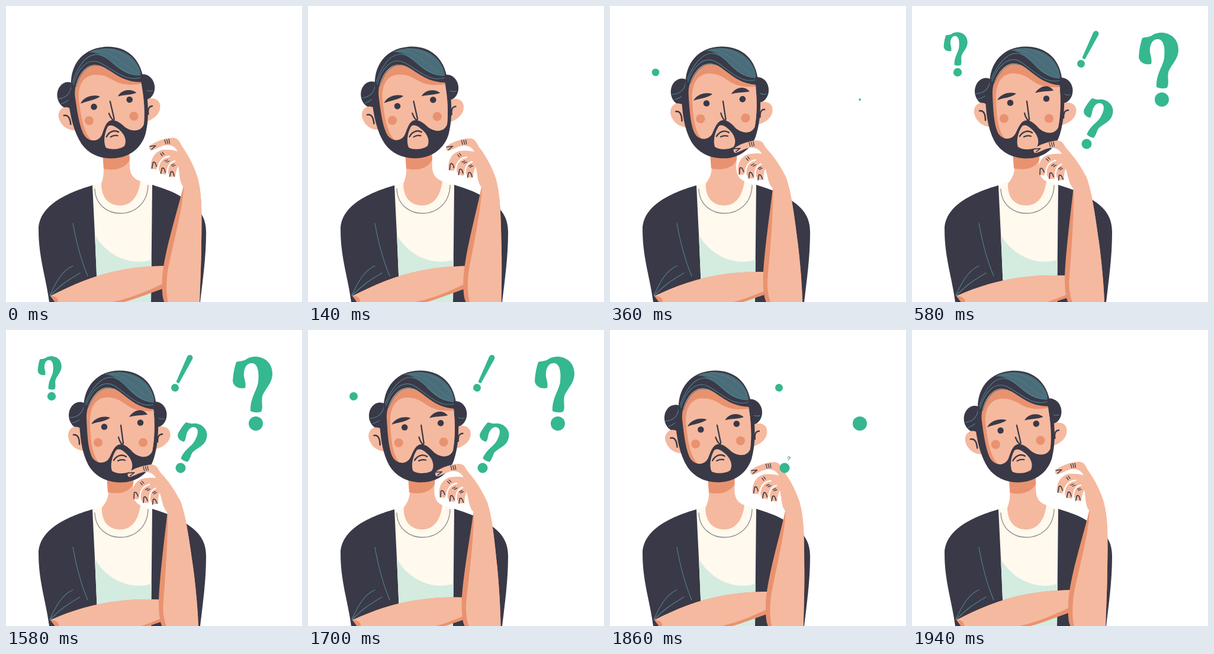
Recreate the animation shown at these times as an HTML page with a canvas. Size 500 by 500 pixels, loop 1.96 s.

```html
<!DOCTYPE html>
<html lang="en">
<head>
<meta charset="utf-8">
<title>Thinking man</title>
<style>
  html, body { margin: 0; width: 100%; height: 100%; overflow: hidden; background: #fff; }
  canvas { display: block; width: 500px; height: 500px; }
</style>
</head>
<body>
<canvas id="stage" width="500" height="500"></canvas>
<script>
const ctx = document.getElementById('stage').getContext('2d');
const LOOP = 1960, STEP = 20;
const INK = '#3a3947', SKIN = '#f5b99f', SHADE = '#e9926f', TEAL = '#4a6d79',
      THREAD = '#4f8190', CREAM = '#fff9ee', MINT = '#d4ebe0', GREEN = '#35b790';

const clamp = v => Math.max(0, Math.min(1, v));
const ramp = (t, from, to) => { const u = clamp((t - from) / (to - from)); return u * u * (3 - 2 * u); };
const lerp = (a, b, p) => a + (b - a) * p;

// Interpolates two paths with the same commands.
function blend(a, b, p) {
  const end = b.match(/-?[\d.]+/g);
  let i = 0;
  return a.replace(/-?[\d.]+/g, n => lerp(+n, +end[i++], p).toFixed(2));
}
function fill(d, color) {
  ctx.fillStyle = color;
  ctx.fill(new Path2D(d));
}
function line(d, color = INK, width = 1.6) {
  ctx.strokeStyle = color;
  ctx.lineWidth = width;
  ctx.lineCap = ctx.lineJoin = 'round';
  ctx.stroke(new Path2D(d));
}
function oval(x, y, rx, ry, color) {
  ctx.fillStyle = color;
  ctx.beginPath();
  ctx.ellipse(x, y, rx, ry, 0, 0, 7);
  ctx.fill();
}
const dot = (x, y, r, color) => oval(x, y, r, r, color);
function group(draw) {
  ctx.save();
  draw();
  ctx.restore();
}
function turn(x, y, angle) {
  ctx.translate(x, y);
  ctx.rotate(angle);
  ctx.translate(-x, -y);
}

function drawBody() {
  fill('M146 303 C108 314 55 335 55 378 C55 425 68 460 73 500 H328 C332 465 338 425 338 382 C338 355 325 338 297 323 C283 313 262 307 247 302Z', INK);
  const shirt = 'M146 303 L163 297 H229 L247 302 L246 400 L245 500 H155 Q151 400 146 303Z';
  fill(shirt, CREAM);
  group(() => {
    ctx.clip(new Path2D(shirt));
    fill('M148 383 C165 415 195 432 225 432 C235 432 242 430 248 428 V500 H148Z', MINT);
  });
  line('M150 309 C152 365 238 365 240 303', '#929292', 1.4);
  line('M113 367 C118 395 127 430 138 456', THREAD, 1.2);
  line('M74 489 C85 465 95 447 113 439', THREAD, 1.2);
  line('M75 489 C95 468 110 460 125 451', THREAD, 1.2);
}

function drawNeck(p) {
  fill(blend(
    'M163 245 L165 274 C165 286 164 292 161 300 C161 322 172 337 193 337 C213 337 224 320 227 296 C215 292 209 284 209 270 L208 245Z',
    'M170 245 L173 274 C173 286 166 295 162 300 C161 322 172 337 193 337 C213 337 224 320 227 296 C218 292 214 284 214 270 L216 245Z', p), SKIN);
  fill(blend(
    'M163 245 L165 275 C182 279 201 275 209 260 L208 245Z',
    'M170 245 L172 274 C190 278 208 275 215 260 L216 245Z', p), SHADE);
}

function drawHair() {
  fill('M132 168 C133 125 152 97 172 97 C196 97 208 130 250 134 L256 166 L254 130 C252 90 227 68.5 192 68.5 C155 68.5 130 95 131 135 L124 150Z', INK);
  fill('M166 75 C200 63 243 78 250 116 C251 121 249 123 246 122 C228 120 218 111 208 101 C196 88 184 76 166 75Z', TEAL);
  line('M135 127 C145 101 163 83 183 94 C205 108 224 132 249 126', THREAD, 1.1);
  line('M134 123 C144 100 160 78 179 80 C202 83 215 119 249 122', THREAD, 1.1);
  line('M176 74 C207 75 222 105 246 118', THREAD, .9);
  line('M190 72 C220 76 237 94 248 113', THREAD, .9);
  line('M139 131 C150 106 164 94 181 99', THREAD, 1);
}

function drawHead(p) {
  group(() => {
    turn(185, 343, -.1 * (1 - p));
    const raise = p * p;

    oval(125, 144, 19, 22.5, INK);
    oval(252.5, 143, 19, 22, INK);
    line('M108 148 C121 148 131 140 132 124', THREAD, 1.1);
    line('M112 157 C125 154 133 145 134 131', THREAD, 1.1);
    line('M249 125 C248 140 254 153 267 150', THREAD, 1.1);

    fill('M126 166 C113 158 102 170 105.5 183 C109 196 120 204 133 204Z', SKIN);
    fill('M251 167 C261 159 278 163 277.5 177 C277 190 265 199 249 202Z', SKIN);
    line('M114 177 C122 176 124 184 124 193', INK, 2.5);
    line('M264 176 C257 176 256 182 256 189', INK, 2.5);

    fill('M124 145 C124 180 128 207 139 228 C150 247 170 257.5 194 257.5 C219 257.5 239 244 248 222 C255 202 258 180 257 145 L235 125 H145Z', INK);
    const face = 'M136 150 C135 122 152 97 172 97 C196 97 208 130 249 132 C252 158 251 186 247 205 C240 219 223 215 214 206 C206 197 200 193 194 193 C184 193 180 205 175 215 C169 226 155 227 147 217 C138 205 137 170 136 150Z';
    fill(face, SHADE);
    group(() => {
      ctx.clip(new Path2D(face));
      fill('M142 160 C140 130 153 112 174 114 C198 116 201 130 222 135 C233 138 245 137 252 137 V230 H164 C146 219 143 190 142 160Z', SKIN);
    });
    drawHair();

    dot(155.5, 190, 7.6, SHADE);
    dot(231.5, 190, 7.6, SHADE);
    dot(166, 163.5 + 4 * (1 - p), 5.3, INK);
    dot(227, 156.5 + 5 * (1 - raise), 5.3, INK);
    fill(blend(
      'M144 160 C150 149 166 146 178 151 C169 157 155 156 144 160Z',
      'M144 159 C150 148 165 144 176 148 C168 155 154 155 144 159Z', p), INK);
    fill(blend(
      'M208 154 C213 145 229 141 240 151 C230 154 219 152 208 154Z',
      'M208 147 C215 136 230 130 239 143 C229 144 218 144 208 147Z', raise), INK);
    line('M194 161 L198 191 C197 197 192 189 190 181', INK, 2.3);

    fill('M186 203 C178 215 176 229 179 238 C187 244 205 243 211 238 C217 228 211 215 201 207 C196 202 190 200 186 203Z', SKIN);
    line('M182 220 C187 212 196 209 203 214', INK, 2.4);
    line('M189 221 Q195 218 201 220', INK, 2.2);
  });
}

function drawForearm(p) {
  const top = 'M75 490 C110 472 150 454 195 446 C222 441 245 439 275 439';
  const topEnd = 'M75 490 C110 474 150 462 190 458 C220 454 245 455 275 456';
  fill(blend(top + ' L275 474 C245 484 222 494 200 500 L84 502Z',
             topEnd + ' L275 490 C260 493 250 497 242 500 L84 502Z', p), SHADE);
  fill(blend(top + ' L275 464 C245 479 214 493 180 500 L88 500 Q88 489 75 490Z',
             topEnd + ' L275 482 C260 488 246 494 228 500 L90 500 Q88 489 75 490Z', p), SKIN);
}

function drawRaisedArm(p) {
  fill(blend(
    'M300 302 C292 340 268 410 264 458 C263 480 264 494 268 501 L327 501 C328 470 330 430 330 400 C331 350 331 310 322 286Z',
    'M273 305 C268 350 259 420 258 460 C258 480 260 494 264 501 L325 501 C324 470 320 430 316 400 C309 350 303 308 293 286Z', p), SHADE);
  fill(blend(
    'M300 302 C300 340 281 405 273 448 C270 474 271 490 274 501 L327 501 C328 470 330 430 330 400 C331 350 331 310 322 286Z',
    'M273 305 C274 350 269 420 266 456 C264 476 267 490 271 501 L325 501 C324 470 320 430 316 400 C309 350 303 308 293 286Z', p), SKIN);
}

function drawHand(p) {
  group(() => {
    ctx.translate(-27 * p, 3 * p);
    turn(300, 303, -.14 * p);

    // Curled fingers and palm
    fill('M282 223 C291 225 294 231 298 238 C308 252 318 270 325 294 L318 310 L300 306 C292 297 294 284 291 270 C288 276 286 282 286 289 L277 288 L272 278 L270 285 L261 283 L256 272 L254 276 L245 275 C243 258 252 246 264 243 C274 242 284 243 291 246Z', SKIN);
    line('M257 277 C257 264 264 255 276 254', '#fff', 2.4);
    line('M273 286 C271 274 276 264 285 262', '#fff', 2.4);
    line('M246.5 274 L248.5 264 Q252.5 262 254 271');
    line('M261.5 283 L263.5 274 Q267.5 272 269 281');
    line('M276.5 288 L278.5 280 Q282.5 278 284 287');
    line('M261 249 L264 253 M264 247 L267 251', INK, 1.3);
    line('M268 262 L273 260 M271 264 L276 262', INK, 1.3);
    line('M279 269 L284 267 M281 271 L286 269', INK, 1.3);

    // Pointing finger
    turn(290, 236, .15 * p);
    fill('M242 238 C245 232 263 225 276 223 C286 221 291 224 295 233 L299 247 L290 246 C286 237 278 234 269 235 C260 237 251 243 245 244 Q241 243 242 238Z', SKIN);
    line('M243 237 L253 236 L246 242');
    line('M268 226 L270 233 M271.5 225.5 L273.5 232.5 M275 225 L276.5 232', INK, 1.3);
  });
}

const QUESTION = 'M-39 -72 C-38 -86 -36 -95 -33 -104 C-27 -106 -22 -105 -17 -108 C-10 -113 -4 -113 2 -113 C18 -111 28 -100 28 -84 C28 -68 15 -58 11 -46 C9 -36 13 -28 9 -20 Q0 -17 -9 -21 C-10 -43 2 -56 4 -70 C6 -88 3 -101 -6 -102 C-17 -103 -21 -90 -20 -80 C-19 -73 -16 -67 -18 -60 C-28 -58 -38 -62 -39 -72Z';
const EXCLAIM = 'M-5 -19 L-9 -104 C-9 -117 9 -117 9 -104 L5 -19 Q0 -14 -5 -19Z';

const MARKS = [
  { x: 77, y: 112, size: .6, angle: 0, shape: QUESTION, show: [290, 380, 470], hide: [1580, 1690, 1790] },
  { x: 422, y: 158, size: 1, angle: 0, shape: QUESTION, show: [340, 420, 510], hide: [1780, 1860, 1920] },
  { x: 285.5, y: 97.5, size: .54, angle: .46, shape: EXCLAIM, show: [390, 450, 540], hide: [1780, 1870, 1930] },
  { x: 295, y: 233, size: .71, angle: .42, shape: QUESTION, show: [420, 490, 580], hide: [1780, 1880, 1940] }
];

function drawMark({ x, y, size, angle, shape, show, hide }, t) {
  const base = ramp(t, show[0], show[1]) - ramp(t, hide[1], hide[2]);
  const body = ramp(t, show[1], show[2]) - ramp(t, hide[0], hide[1]);
  group(() => {
    ctx.translate(x, y);
    ctx.rotate(angle);
    ctx.scale(size, size);
    if (base > 0) dot(0, 0, 12 * base, GREEN);
    if (body > 0) {
      ctx.translate(0, -20);
      ctx.scale(body, body);
      ctx.translate(0, 20);
      fill(shape, GREEN);
    }
  });
}

function render(now) {
  const t = Math.floor(now % LOOP / STEP) * STEP;
  const head = ramp(t, 35, 475) - ramp(t, 1600, 2000);
  const hand = ramp(t, 0, 440) - ramp(t, 1580, 1940);
  const forearm = ramp(t, 100, 560) - ramp(t, 1580, 1960);
  ctx.fillStyle = '#fff';
  ctx.fillRect(0, 0, 500, 500);
  drawBody();
  drawNeck(head);
  drawHead(head);
  drawForearm(forearm);
  drawRaisedArm(hand);
  drawHand(hand);
  MARKS.forEach(mark => drawMark(mark, t));
}

const start = performance.now();
function tick() {
  render(performance.now() - start);
  requestAnimationFrame(tick);
}
tick();
</script>
</body>
</html>
```
